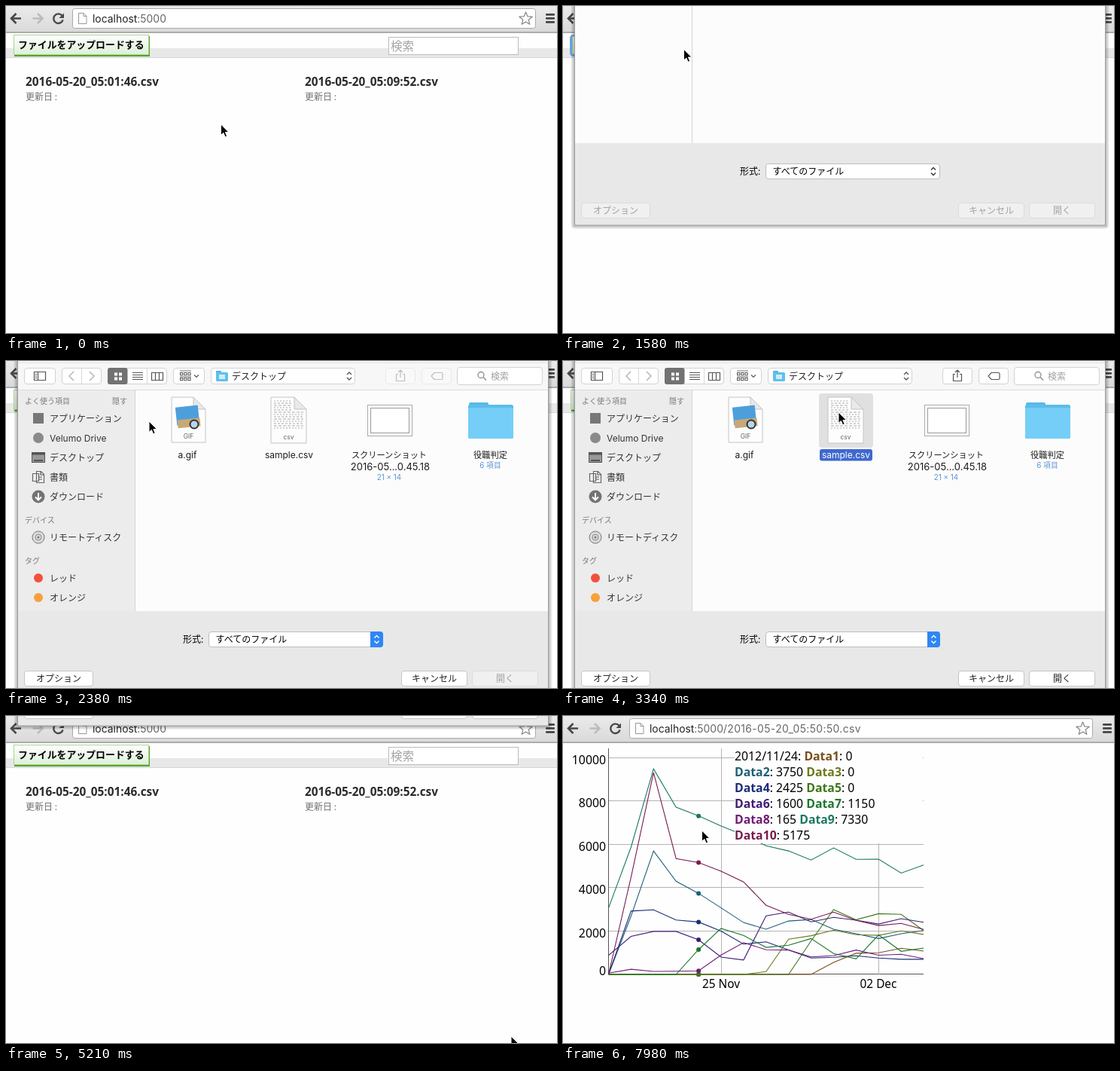
An HTML page that plays this animation: 732x434 px, repeating every 8 s.

```html
<!DOCTYPE html>
<html lang="ja">
<head>
<meta charset="utf-8">
<title>CSV upload</title>
<style>
html, body { margin: 0; width: 100%; height: 100%; overflow: hidden; background: #fefefe; }
svg { display: block; width: 732px; height: 434px; }
text { font-family: "Noto Sans CJK JP", "Noto Sans CJK", sans-serif; white-space: pre; }
.ui { font-family: Inter, "Noto Sans CJK JP", sans-serif; }
.num { font-family: "Noto Sans", "Open Sans", sans-serif; }
.line { fill: none; stroke: #555; stroke-width: 1.2; }
.box { fill: #fff; stroke: #d2d2d2; }
.mid { text-anchor: middle; }
.hide, .off .on, .on .wait, .off .cap, .pick .plain { display: none; }
.off .ctl, .need { opacity: .35; }
.pick .need { opacity: 1; }
.picked { display: none; }
.pick .picked { display: inline; }
.off .seg { fill: #dedede; }
.off .segi { fill: #888; }
.press .open rect { fill: #3b8cf6; }
.press .open text { fill: #fff; }
</style>
</head>
<body>
<svg id="stage" viewBox="0 0 732 434"></svg>
<script>
const LOOP = 8000;
const rect = (x, y, w, h, fill, more = '') =>
  `<rect x="${x}" y="${y}" width="${w}" height="${h}" fill="${fill}" ${more}/>`;
const box = (x, y, w, h, more = 'rx="3.5"') =>
  `<rect class="box" x="${x + .5}" y="${y + .5}" width="${w - 1}" height="${h - 1}" ${more}/>`;
const text = (x, y, s, size = 12, more = '') =>
  `<text x="${x}" y="${y}" font-size="${size}" ${more}>${s}</text>`;
const path = (d, more = 'class="line"') => `<path d="${d}" ${more}/>`;
const dot = (x, y, r, fill, more = '') => `<circle cx="${x}" cy="${y}" r="${r}" fill="${fill}" ${more}/>`;
const group = (more, ...parts) => `<g ${more}>${parts.join('')}</g>`;
const grid = (cols, rows, fn) =>
  Array.from({ length: cols * rows }, (_, i) => fn(i % cols, Math.floor(i / cols))).join('');

// Browser bar
const arrow = (x, color) => path(`M${x + 14} 16.5H${x + 2}M${x + 7.5} 10L${x + 1} 16.5L${x + 7.5} 23`,
  `fill="none" stroke="${color}" stroke-width="2.6"`);
const star = Array.from({ length: 10 }, (_, i) => {
  const a = Math.PI * (i / 5 - .5), r = i % 2 ? 3.9 : 9;
  return `${(690.5 + r * Math.cos(a)).toFixed(1)},${(17 + r * Math.sin(a)).toFixed(1)}`;
}).join(' ');
const bar = group('',
  rect(0, 0, 732, 35, 'url(#bar)'), rect(0, 34.5, 732, 1.2, '#858585'),
  arrow(6, '#484848'),
  group('transform="translate(55.5 0) scale(-1 1)"', arrow(6, '#bcbcbc')),
  path('M74.4 12.6A6.3 6.3 0 1 0 75.6 18.4', 'fill="none" stroke="#484848" stroke-width="2.4"'),
  path('M77 9.5V16H70.4Z', 'fill="#484848"'),
  rect(88.5, 3.5, 615, 26, '#fff', 'rx="3" stroke="#a9a9a9"'),
  path('M96.5 9.5H103L107 13.5V23.5H96.5ZM103 9.5V13.5H107', 'fill="#fdfdfd" stroke="#979797"'),
  `<text x="115" y="22" font-size="13.9" class="ui" fill="#222">localhost<tspan fill="#666">:5000<tspan id="route" letter-spacing=".38">/2016-05-20_05:50:50.csv</tspan></tspan></text>`,
  `<polygon points="${star}" fill="#fff" stroke="#858585" stroke-width="1.2" stroke-linejoin="round"/>`,
  [10, 15, 20].map(y => rect(717, y, 12, 2.8, '#444', 'rx="1"')).join(''));

// File list
const card = (id, x, y, name) => group(`id="${id}"`,
  rect(x - 18, y - 22, 280, 58, '#fefefe', 'rx="14" class="edge" stroke="#cffafb" stroke-width="2"'),
  text(x, y + 5, name, 15.4, 'class="num" font-weight="600" fill="#2b2b2b"'),
  text(x, y + 24, '更新日 :', 12, 'fill="#707070"'));
const page = group('id="page"',
  rect(0, 56, 732, 13, '#e8e8e8'), rect(0, 68, 732, 1, '#d6d6d6'),
  rect(508.5, 41.5, 172, 23, '#fff', 'stroke="#bcbcbc"'),
  text(511, 58.5, '検索', 15.6, 'fill="#a5a5a5" font-weight="500"'),
  group('id="btn"',
    rect(11, 40, 180, 27, '#59a22c', 'id="lip"'),
    rect(8.5, 37.5, 183, 29, 'none', 'id="ring" rx="3" stroke="#6ba8f0" stroke-width="3"'),
    rect(10.5, 38.5, 179, 26, 'url(#green)', 'id="face" stroke="#a9d592"'),
    text(16, 55.7, 'ファイルをアップロードする', 12.9, 'font-weight="700"')),
  card('c1', 26, 101, '2016-05-20_05:01:46.csv'),
  card('c2', 397, 101, '2016-05-20_05:09:52.csv'),
  card('c3', 26, 165, '2016-05-20_05:50:50.csv'));

// Chart: values in tens, missing leading days are zero
const series = [
  [56, 98, 100, 121, 108],
  [0, 270, 571, 431, 375, 308, 240, 209, 247, 254, 209, 188, 166, 188, 203],
  [13, 163, 179, 205, 184, 181, 201, 185],
  [0, 293, 299, 252, 242.5, 200, 140, 151, 113, 76, 79, 86, 76, 70, 70],
  [155, 300, 253, 281, 278, 203],
  [88, 176, 199, 199, 160, 80, 67, 271, 288, 243, 264, 251, 233, 258, 241],
  [115, 213, 180, 125, 135, 166, 97, 72, 183, 107, 122],
  [6, 24, 14, 15, 16.5, 90, 147, 114, 113, 81, 87, 113, 89, 93, 73],
  [307, 589, 951, 773, 733, 686, 645, 595, 571, 529, 585, 532, 533, 469, 506],
  [0, 450, 933, 536, 517.5, 477, 428, 320, 278, 255, 288, 250, 226, 236, 208]
].map(s => [...Array(15 - s.length).fill(0), ...s]);
const hue = i => (i % 2 ? 6 + (i - 1) / 2 : i / 2 + 1) * 360 / 11;
const color = i => `hsl(${hue(i).toFixed()} 62% 29%)`;
const px = i => 60.5 + i * 29.9;
const py = v => 343 - v * .287;
const chart = group('id="chart"',
  rect(0, 36, 732, 398, '#fefefe'),
  [0, 2, 4, 6, 8, 10].map(k => {
    const y = Math.round(py(k * 100)) - .5;
    return path(`M60 ${y}H479`, `stroke="${k ? '#b4b4b4' : '#555'}"`) +
      text(57, k ? y + 8 : y + 1.5, k * 1000, 15.8, 'class="num" text-anchor="end"');
  }).join(''),
  path('M210.5 43V343M419.5 43V343', 'stroke="#b4b4b4"'), path('M60.5 43V343', 'stroke="#555"'),
  text(210, 361, '25 Nov', 15.4, 'class="num mid"'), text(419, 361, '02 Dec', 15.4, 'class="num mid"'),
  series.map((s, i) => `<polyline fill="none" stroke="${color(i)}" stroke-width="1.1" points="${
    s.map((v, k) => `${px(k).toFixed(1)},${py(v).toFixed(1)}`).join(' ')}"/>`).join(''),
  '<g id="legend"></g>');

function legend(day) {
  const item = i => `<tspan fill="${color(i)}" font-weight="700">Data${i + 1}</tspan>: ${series[i][day] * 10}`;
  const rows = [`2012/11/${20 + day}: ${item(0)}`];
  for (let i = 1; i < 9; i += 2) rows.push(item(i) + ' ' + item(i + 1));
  rows.push(item(9));
  return series.map((s, i) => dot(px(day), py(s[day]), 3, color(i))).join('') +
    rect(228, 43, 250, 126, '#fefefe') +
    rows.map((r, k) => text(228, 58.5 + k * 21, r, 15.8, 'class="num"')).join('');
}

// Open dialog
const updown = (x, y, c = '#555') =>
  path(`M${x - 3} ${y - 2}l3-3 3 3M${x - 3} ${y + 2}l3 3 3-3`, `fill="none" stroke="${c}" stroke-width="1.4"`);
const folder = (x, y) => rect(x, y, 7, 4, '#4fb4e6', 'rx="1"') + rect(x, y + 2, 16, 12, '#5fc0ee', 'rx="1.5"');
const button = (x, w, label, cls) => group(`class="${cls}"`,
  rect(x + .5, 411.5, w - 1, 20, '#fff', 'rx="3.5" stroke="#c6c6c6"'),
  text(x + w / 2, 426, label, 12, 'class="mid" fill="#222"'));
const head = (y, s) => text(25, y, s, 10, 'font-weight="500" fill="#7a7a7a"');
const item = (y, s, icon) => group(`transform="translate(0 ${y})"`, icon, text(58, 4.6, s, 12, 'class="ui" fill="#333"'));
const note = (x, y, s) => text(x, y, s, 9.8, 'class="ui mid" fill="#5b93d6"');
const label = (x, y, s, size = 12) => text(x, y, s, size, 'class="ui mid" fill="#1d1d1d"');
const sheetOf = (x, y, w, h, kind) =>
  path(`M${x} ${y}h${w - 16}l16 16v${h - 16}h${-w}Z`, 'fill="#fdfdfd" stroke="#c4c4c4"') +
  path(`M${x + w - 16} ${y}v16h16Z`, 'fill="#e9e9e9" stroke="#c4c4c4"') +
  text(x + w / 2, y + h - 5, kind, 8.5, 'class="ui mid" fill="#666"');

const toolbar = group('',
  group('class="ctl"', box(24, 9, 42, 22), path('M37.5 14.5h15v11h-15zM42.5 14.5v11M39 17.5h2M39 20h2M39 22.5h2')),
  box(74, 9, 53, 22), path('M100.5 9V31', 'stroke="#d8d8d8"'),
  path('M90 14l-6 6 6 6M111 14l6 6-6 6', 'fill="none" stroke="#b0b0b0" stroke-width="1.4"'),
  box(135, 9, 79, 22),
  rect(135, 9, 26.5, 22, '#727272', 'class="seg" rx="3"'),
  grid(2, 2, (x, y) => rect(144 + x * 6, 15.5 + y * 6, 4, 4, '#fff', 'class="segi"')),
  path('M187.5 9V31', 'stroke="#d8d8d8"'),
  group('class="ctl"',
    path('M168 15.5h14M168 18.5h14M168 21.5h14M168 24.5h14M193.5 15.5h15v10h-15zM198.5 15.5v10M203.5 15.5v10'),
    box(222, 9, 42, 22),
    grid(3, 2, (x, y) => rect(231.5 + x * 5.2, 15.5 + y * 7, 3.2, 3.2, 'none', 'stroke="#555"')),
    path('M231 13h15M231 20.8h15', 'stroke="#777"'),
    path('M250 18.5l3 3 3-3'),
    box(272, 9, 192, 22), updown(456, 20)),
  folder(279, 13), rect(283, 18, 8, 6, '#fff', 'opacity=".7"'),
  '<text id="place" x="300" y="24.5" font-size="12"></text>',
  group('class="need"', box(504, 9, 40, 22), path('M521 17.5h-2.5v9h11v-9H527M524 22V12M521 15l3-3 3 3'),
    box(552, 9, 40, 22), path('M569 15.5h9.5q1.5 0 1.5 1.5v6q0 1.5-1.5 1.5H569l-4-4.5Z')),
  box(599, 8, 114, 24),
  dot(631, 18.5, 4, 'none', 'stroke="#8d8d8d" stroke-width="1.3"'),
  path('M634 21.5l4 4', 'stroke="#8d8d8d" stroke-width="1.5"'),
  text(644, 24.5, '検索', 12, 'fill="#a0a0a0"'));

const waiting = group('class="wait" clip-path="url(#side)"',
  item(39, 'ミュージック', path('M39 6V-5l9-2V4M39-3l9-2') + dot(37, 6, 2.2, '#666') + dot(46, 4, 2.2, '#666')),
  item(64, '写真', rect(34, -4, 18, 11, '#777', 'rx="1.5"') + rect(39, -6.5, 8, 4, '#777') +
    dot(43, 1.5, 4, '#ddd') + dot(43, 1.5, 2.6, '#777')),
  item(90, 'ムービー', rect(35.5, -8, 15, 16, '#c9c9c9', 'stroke="#555"') + path('M38.5-8V8M47.5-8V8M38.5 0h9')));

const sidebar = group('class="on"',
  rect(16, 39, 155, 293, '#ececec', 'id="tint"'),
  head(57, 'よく使う項目'), text(141, 57, '隠す', 10, 'fill="#7a7a7a"'),
  item(76, 'アプリケーション', rect(36, -7, 14, 14, '#777')),
  item(102, 'Velumo Drive', dot(43, 0, 7, '#8a8a8a')),
  item(128, 'デスクトップ', rect(34.5, -6.5, 17, 13, '#999', 'stroke="#555"') + rect(34, -6.5, 18, 3, '#555') + rect(37, 3, 12, 2, '#555')),
  item(154, '書類', path('M35.5-4.5h8v10h-8zM40.5-7.5h6l4 4V7.5h-10z', 'fill="#efefef" stroke="#666" stroke-width="1.2"') + path('M46-7v4h4M43 0h5M43 3h5')),
  item(180, 'ダウンロード', dot(43, 0, 8.5, '#737373') + path('M43-5V4M39 .5l4 4 4-4', 'fill="none" stroke="#fff" stroke-width="2"')),
  head(214.5, 'デバイス'),
  item(234, 'リモートディスク', dot(43, 0, 8, '#dcdcdc', 'stroke="#777"') + dot(43, 0, 4, 'none', 'stroke="#888"') + dot(43, 0, 1.6, '#777')),
  head(268.5, 'タグ'),
  item(288, 'レッド', dot(43, 0, 6, '#f2503f')),
  item(314, 'オレンジ', dot(43, 0, 6, '#f9a03c')));

const files = group('id="files"',
  sheetOf(220, 48, 45, 60, 'GIF'),
  rect(226, 60, 30, 24, '#4d9fdc', 'transform="rotate(-6 241 72)"'), rect(228, 77, 30, 11, '#c8a878', 'transform="rotate(-6 241 82)"'),
  dot(250, 84, 6.5, '#333'), dot(250, 84, 4.5, '#b9d6ea'),
  label(241, 129, 'a.gif'),
  rect(340, 43, 72, 72, '#e0e0e0', 'rx="4" class="picked"'),
  sheetOf(352, 48, 47, 61, 'csv'),
  grid(1, 13, (_, y) => path(`M356 ${53 + y * 3}H${y < 5 ? 380 : 395}`, `stroke="#aaa" stroke-width="1" stroke-dasharray="${2 + y % 3} 2"`)),
  group('class="plain"', label(376, 129, 'sample.csv')),
  group('class="picked"', rect(341, 117, 70, 15.5, '#3f69cf', 'rx="3"'),
    text(376, 129, 'sample.csv', 12, 'class="ui mid" fill="#fff"')),
  rect(480.5, 58.5, 59, 41, '#fff', 'stroke="#aaa"'), rect(484.5, 62.5, 51, 33, '#fff', 'stroke="#999"'),
  label(509, 129, 'スクリーンショット', 11.2), label(510.5, 145, '2016-05...0.45.18', 13), note(509, 158, '21 × 14'),
  rect(615, 55, 26, 8, '#59b9e6', 'rx="2"'), rect(614, 58, 60, 45, '#5bbde9', 'rx="2.5"'), rect(614, 62, 60, 41, '#75cef7', 'rx="2.5"'),
  label(643.5, 129, '役職判定', 11.2), note(643.5, 142, '6 項目'));

const sheet = group('id="sheet"',
  [5, 4, 3, 2, 1].map(r => rect(15.5 - r, -4, 705 + 2 * r, 445 + r, '#000', `opacity=".06" rx="${r}"`)).join(''),
  rect(15.5, -4.5, 705, 445.5, '#e8e8e8', 'stroke="#9c9c9c"'),
  rect(16, -4, 704, 42, '#f7f7f7'), rect(16, 2, 704, 1, '#e2e2e2'), rect(16, 38, 704, 294, '#fcfcfc'),
  waiting, sidebar, files,
  rect(16, 38, 704, 1, '#dcdcdc'), rect(171, 39, 1, 293, '#d4d4d4'), toolbar,
  text(235, 373.5, '形式:'),
  box(269, 359, 232, 21, 'rx="3.5" style="stroke:#bdbdbd"'), text(278.5, 373.8, 'すべてのファイル'),
  group('class="wait"', updown(492, 369.5, '#333')),
  group('class="cap"', path('M484 359h13q4 0 4 4v13q0 4-4 4h-13z', 'fill="#2f86f6"'), updown(492.5, 369.5, '#fff')),
  button(24, 92, 'オプション', 'ctl'), button(525, 88, 'キャンセル', 'ctl'), button(619, 88, '開く', 'open need'));

const cursor = group('id="cursor"',
  path('M0 0V14.5L3.4 11.4L5.6 16.8L8.1 15.7L5.9 10.5H10.4Z', 'id="tip" fill="#000" stroke="#fff"'),
  path('M3.6 1.6q1.5-1.4 2.4.4V7l1-.4q1.4-.2 1.7.9 1.5-.5 2 .8 1.6-.4 1.9 1V12q0 2-1.3 3.5V17H5.2v-1.3Q2.2 13 .8 10q.3-1.7 1.8-.9l1 .9Z',
    'id="hand" fill="#fff" stroke="#000" stroke-width="1.1"') );

const grad = (id, a, b) => `<linearGradient id="${id}" x2="0" y2="1"><stop stop-color="${a}"/><stop offset="1" stop-color="${b}"/></linearGradient>`;
document.getElementById('stage').innerHTML =
  `<defs>${grad('bar', '#ebebeb', '#d9d9d9')}${grad('green', '#fff', '#dcf0d8')}
  <clipPath id="side">${rect(16, 39, 155, 293, '#000')}</clipPath></defs>` +
  rect(0, 0, 732, 434, '#fefefe') + page + chart + bar + sheet + cursor;

// Steps: time, x, y
const moves = [
  [0, 285.5, 157], [80, 288, 162], [170, 299, 180], [260, 304, 190], [350, 300, 184], [430, 290, 168],
  [520, 262, 140], [600, 230, 115], [690, 200, 92], [780, 176, 72], [870, 160.5, 57.5],
  [2380, 190, 80], [2470, 280, 140], [2560, 360, 170], [2640, 390, 176],
  [3000, 386, 150], [3080, 378, 110], [3170, 370, 85], [3250, 366, 68],
  [3610, 500, 220], [3700, 658, 413], [3870, 662, 416], [3960, 663, 416],
  [4500, 667, 421], [4590, 671, 425], [5300, 660, 400], [5390, 625, 340], [5470, 563, 261],
  [5650, 520, 215], [5730, 475, 179], [5910, 460, 172], [5990, 446, 166], [6070, 445, 164],
  [6160, 458, 165], [6230, 476, 168], [6480, 380, 168], [6570, 268, 159], [6740, 215, 160],
  [6830, 165, 159], [6920, 127.5, 158.5], [7280, 131, 158], [7810, 145, 156], [7900, 165, 153], [7980, 184.5, 152]
];
const slides = [[0, -460], [1490, -330], [1580, -150], [1670, -35], [1760, 0],
  [4940, -70], [5030, -240], [5120, -375], [5210, -428], [5300, -460]];
const at = (steps, t) => steps.findLast(s => s[0] <= t);
const during = (t, a, b) => t >= a && t < b;
const $ = Object.fromEntries([...document.querySelectorAll('[id]')].map(e => [e.id, e]));
const show = (el, yes) => el.classList.toggle('hide', !yes);
const edges = ['c1', 'c2', 'c3'].map(id => $[id].querySelector('.edge'));

let shownDay = -1;
function draw(t) {
  const [, x, y] = at(moves, t);
  const pressed = during(t, 1050, 2380), charted = t >= 7280;
  const over1 = during(t, 600, 780), over3 = during(t, 6570, 7280);
  const hand = over1 || over3 || during(t, 1220, 1490);
  $.cursor.setAttribute('transform', `translate(${during(t, 1220, 1490) ? '157 57.5' : x + ' ' + y})`);
  show($.hand, hand);
  show($.tip, !hand);

  show($.ring, pressed || t >= 5390);
  show($.lip, !pressed);
  $.btn.setAttribute('transform', pressed ? 'translate(2 2)' : '');
  $.face.setAttribute('height', pressed ? 23 : 26);
  $.ring.setAttribute('height', pressed ? 26 : 29);
  show($.c3, t >= 5470);
  edges.forEach((e, i) => show(e, [over1, false, over3][i]));

  const drop = at(slides, t)[1];
  show($.sheet, drop > -460);
  $.sheet.setAttribute('transform', `translate(0 ${drop})`);
  $.sheet.setAttribute('class', [t < 1930 ? 'off' : 'on', t >= 3340 ? 'pick' : '',
    during(t, 4590, 4760) ? 'press' : '', drop > -460 ? '' : 'hide'].join(' '));
  $.tint.setAttribute('opacity', at([[0, .4], [2020, .65], [2110, .85], [2200, 1]], t)[1]);
  $.place.textContent = t < 2380 ? '書類' : 'デスクトップ';
  $.place.setAttribute('fill', t < 1930 ? '#a0a0a0' : '#222');
  show($.files, t >= 2380);

  show($.page, !charted);
  show($.route, charted);
  show($.chart, t >= 7360);
  const day = t >= 7810 ? Math.round((x - 60) / 29.9) : 0;
  if (day !== shownDay) {
    $.legend.innerHTML = day ? legend(day) : '';
    shownDay = day;
  }
}

const start = performance.now();
function tick() {
  draw((performance.now() - start) % LOOP);
  requestAnimationFrame(tick);
}
tick();
</script>
</body>
</html>
```
